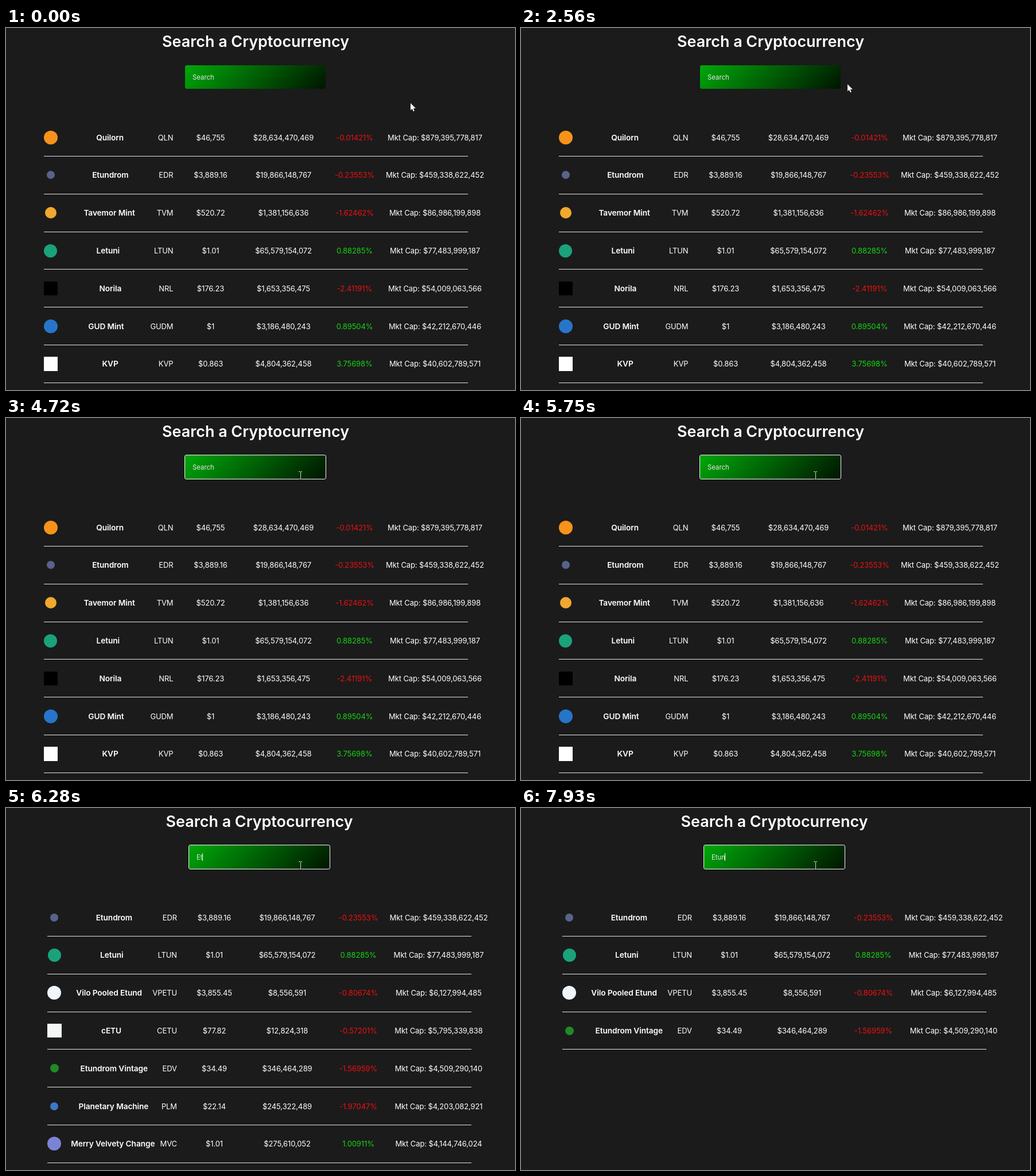
An HTML page for the animation above (8 s loop, 887 by 631 pixels).

```html
<!DOCTYPE html>
<html lang="en">
<head>
<meta charset="utf-8">
<title>Search a Cryptocurrency</title>
<style>
  html, body { margin: 0; width: 100%; height: 100%; overflow: hidden; background: #1b1b1b; }
  body { position: relative; color: #fff; font: 13px Inter, sans-serif; letter-spacing: -.1px; white-space: nowrap; }
  #app { position: absolute; left: 65.5px; top: 0; width: 739px; }
  #app.shifted { left: 72px; }
  h1 { margin: 0; position: absolute; top: 3px; width: 100%; text-align: center;
       font-size: 26.9px; font-weight: 600; line-height: 40px; letter-spacing: 0; }
  #search { position: absolute; left: 246.5px; top: 65px; width: 245px; height: 41px; padding-left: 13px;
            box-sizing: border-box; display: flex; align-items: center; border-radius: 3px;
            font-size: 11.4px; letter-spacing: 0; color: #e5e5e5;
            background: linear-gradient(135deg, #00a80a, #001500); }
  .shifted #search { left: 247px; }
  #search.focus { box-shadow: 0 0 0 1px #fff, 0 0 0 2px #101010; }
  #caret { width: 1px; height: 13px; margin-left: -1px; background: #fff; }
  #list { position: absolute; top: 158.3px; width: 100%; }
  .row { height: 65.8px; box-sizing: border-box; border-bottom: 1px solid #e4e4e4; display: grid;
         grid-template-columns: 32px 194px 130px 124px 124px 156px; align-items: center; justify-items: center; }
  .icon { width: 24.6px; display: grid; place-items: center; justify-self: start; }
  .name { justify-self: stretch; display: flex; align-items: center; }
  .name b { flex: 1; text-align: center; font-size: 13.7px; font-weight: 600; }
  .down { color: #f00f10; }
  .up { color: #11d811; }
  svg { position: absolute; left: 0; top: 0; }
</style>
</head>
<body>
<div id="app">
  <h1>Search a Cryptocurrency</h1>
  <div id="search"><span id="typed"></span><i id="caret"></i><span id="hint">Search</span></div>
  <div id="list"></div>
</div>
<svg width="887" height="631">
  <path id="arrow" fill="#fff" d="M0 0V12.3L2.8 9.7L4.8 14.3L6.8 13.4L4.8 9H9Z"/>
  <path id="beam" fill="none" stroke="#d0d0d0" d="M-3-6.5H0M1-6.5H3M.5-6V6M-3 6.5H0M1 6.5H3"/>
</svg>
<script>
const $ = id => document.getElementById(id);

// name, symbol, price, volume, change, market cap, icon colour, icon size, square icon
const coins = [
  ['Quilorn', 'QLN', 46755, 28634470469, -0.01421, 879395778817, '#f7931a', 24],
  ['Etundrom', 'EDR', 3889.16, 19866148767, -0.23553, 459338622452, '#59628a', 14],
  ['Tavemor Mint', 'TVM', 520.72, 1381156636, -1.62462, 86986199898, '#f0a92e', 20],
  ['Letuni', 'LTUN', 1.01, 65579154072, 0.88285, 77483999187, '#1aa27b', 23],
  ['Norila', 'NRL', 176.23, 1653356475, -2.41191, 54009063566, '#000', 24.6, true],
  ['GUD Mint', 'GUDM', 1, 3186480243, 0.89504, 42212670446, '#2775ca', 24],
  ['KVP', 'KVP', 0.863, 4804362458, 3.75698, 40602789571, '#fff', 24.6, true],
  ['Velda', 'VLDA', 81.61, 3987613989, 11.34921, 30212614180, '#172852', 24],
  ['Rimecliff', 'RIMC', 111.97, 1621067053, 3.85792, 27038110430, '#e84142', 24],
  ['Mulemint', 'MULE', 0.166, 950633028, -2.57811, 21907066490, '#c2a34c', 24],
  ['Tavemor GUD', 'TGUD', 1, 3693431640, 1.25078, 14561984162, '#efb01a', 18],
  ['Vilo Pooled Etund', 'VPETU', 3855.45, 8556591, -0.80674, 6127994485, '#eef6fb', 24],
  ['cETU', 'CETU', 77.82, 12824318, -0.57201, 5795339838, '#f4f6f6', 24.6, true],
  ['Etundrom Vintage', 'EDV', 34.49, 346464289, -1.56959, 4509290140, '#218a24', 15],
  ['Planetary Machine', 'PLM', 22.14, 245322489, -1.97047, 4203082921, '#3a78c8', 14],
  ['Merry Velvety Change', 'MVC', 1.01, 275610052, 1.00911, 4144746024, '#7b84d4', 24],
];

const money = n => '$' + n.toLocaleString('en-US');

const row = ([name, symbol, price, volume, change, cap, color, size, square]) => `
  <div class="row">
    <span class="icon"><i style="width:${size}px;height:${size}px;background:${color};border-radius:${square ? 0 : '50%'}"></i></span>
    <span class="name"><b>${name}</b>${symbol}</span>
    <span>${money(price)}</span>
    <span>${money(volume)}</span>
    <span class="${change < 0 ? 'down' : 'up'}">${change.toFixed(5)}%</span>
    <span>Mkt Cap: ${money(cap)}</span>
  </div>`;

const keys = [[5980, 'E'], [6280, 'Et'], [7500, 'Etu'], [7930, 'Etun']];
const blinks = [3110, 3640, 4180, 4720, 5220, 5750, 5980, 6810, 7340];
let shown = null;

function showQuery(query) {
  if (query === shown) return;
  shown = query;
  $('typed').textContent = query;
  $('hint').hidden = query !== '';
  $('app').className = query.length > 1 ? 'shifted' : '';
  $('list').innerHTML = coins
    .filter(([name]) => name.toLowerCase().includes(query.toLowerCase()))
    .slice(0, 7).map(row).join('');
}

// Index of the current step, 0 before the start and count at the end
const stepAt = (t, start, end, count) =>
  t < start ? 0 : Math.min(count, 1 + Math.floor((t - start) / (end - start) * (count - 1) + 1e-6));

function pointer(t) {
  const nudge = stepAt(t, 3410, 3640, 4);
  if (nudge) return [517 - nudge, 96 + (nudge - 1) * 4 / 3];
  const p = stepAt(t, 2170, 2740, 20) / 20;
  const across = .6 * p + .4 * p * p * (3 - 2 * p);
  const up = p * (2 - p);
  return [705 - 186 * across, 131 - 36 * up];
}

function draw(t) {
  const typed = keys.filter(([at]) => t >= at).pop();
  showQuery(typed ? typed[1] : '');
  $('search').className = t >= 3110 ? 'focus' : '';
  $('caret').style.opacity = blinks.filter(at => t >= at).length % 2;

  const [x, y] = pointer(t).map(Math.round);
  const overInput = x < 558 && y < 106;
  $('arrow').style.display = overInput ? 'none' : '';
  $('beam').style.display = overInput ? '' : 'none';
  $(overInput ? 'beam' : 'arrow').setAttribute('transform', `translate(${x} ${y})`);
}

function loop() {
  draw(performance.now() % 8000);
  requestAnimationFrame(loop);
}
loop();
</script>
</body>
</html>
```
